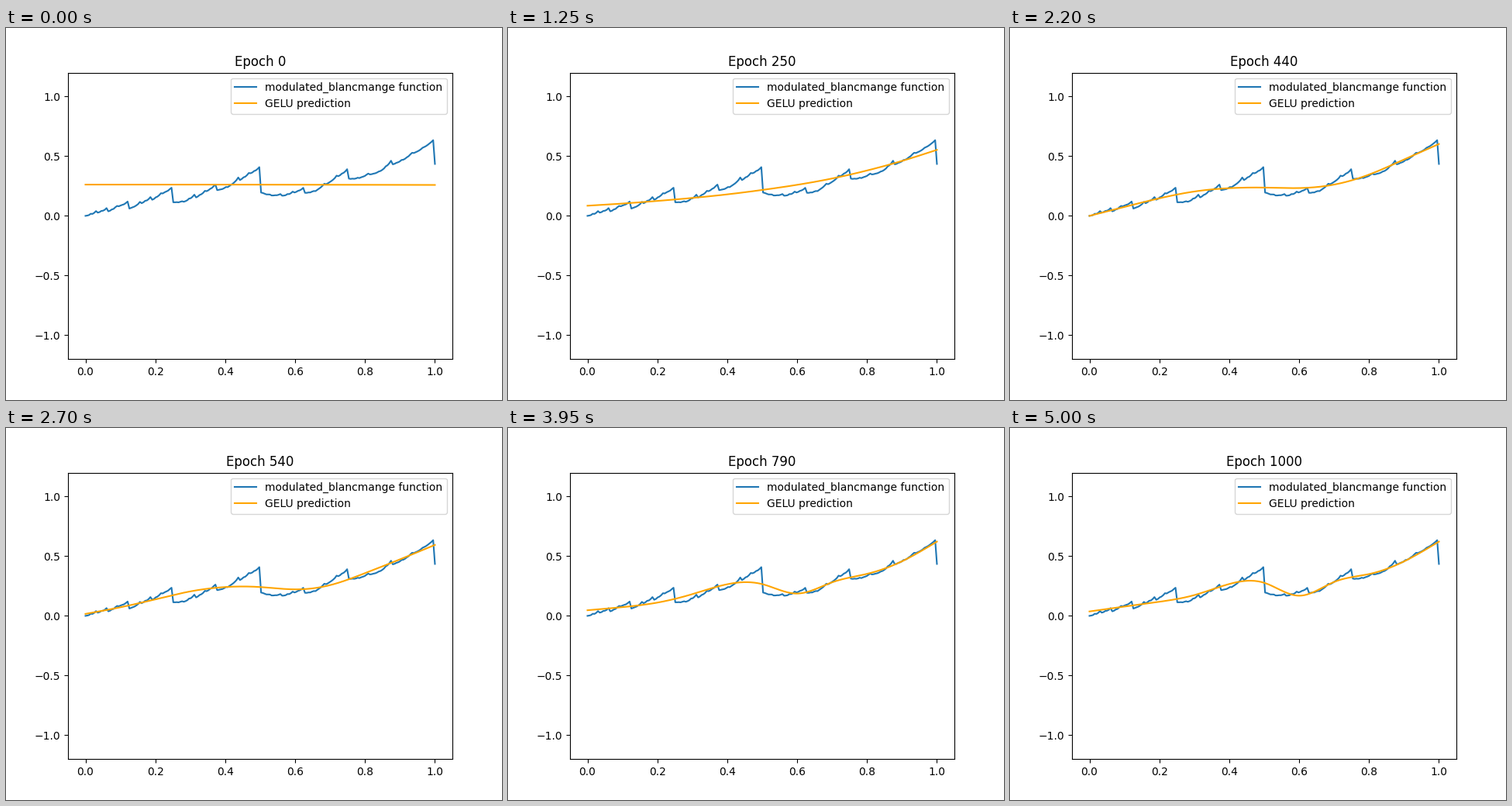
These frames come from a looping animation (640 px wide and 480 px high, 5050 ms). A matplotlib script:

```python
import numpy as np
import matplotlib.pyplot as plt
from matplotlib.animation import FuncAnimation

FRAMES, STEP_MS, EPOCHS = 101, 50, 10
x = np.linspace(0, 1, 200)

# Smooth trend carried by the fractal, sampled every 1/32
TREND = [0, .053, .081, .125, .135, .179, .1995, .231, .2275, .239, .267,
         .301, .311, .320, .344, .359, .340, .329, .327, .342, .339, .342,
         .376, .404, .400, .399, .409, .407, .430, .439, .450, .447, .435]


def blancmange(x, levels=20):
    """Return the sawtooth and the triangle series of halving scale."""
    saw, tri = np.zeros_like(x), np.zeros_like(x)
    for n in range(levels):
        u = (x * 2**n) % 1
        saw += u / 2**n
        tri += np.minimum(u, 1 - u) / 2**n
    return saw, tri


def modulated_blancmange(x):
    saw, tri = blancmange(x)
    trend = np.interp(x, np.linspace(0, 1, len(TREND)), TREND)
    return (.33 - .22 * x) * saw - .5 * tri + trend


def spline(values):
    """Natural cubic spline through evenly spaced values, evaluated on x."""
    v = np.array(values)
    n = len(v) - 1
    a = np.eye(n + 1)
    rhs = np.zeros(n + 1)
    for i in range(1, n):
        a[i, i - 1:i + 2] = 1, 4, 1
        rhs[i] = 6 * (v[i - 1] - 2 * v[i] + v[i + 1])
    m = np.linalg.solve(a, rhs)
    i = np.minimum((x * n).astype(int), n - 1)
    t = x * n - i
    s = 1 - t
    return (s * v[i] + t * v[i + 1]
            + ((s**3 - s) * m[i] + (t**3 - t) * m[i + 1]) / 6)


def parabola(c, b, a):
    return c + b * x + a * x**2


# Shape of the fit at chosen epochs; it blends between them
FITS = {
    0: parabola(.262, .001, -.004),
    50: parabola(-.012, .36, .08),
    90: parabola(.058, .264, .18),
    250: spline([.085, .103, .125, .150, .180, .217, .260, .313, .380, .460, .553]),
    330: spline([.004, .070, .128, .173, .205, .224, .243, .280, .346, .448, .580]),
    440: spline([.000, .075, .147, .204, .232, .237, .233, .262, .346, .472, .602]),
    640: spline([.033, .069, .130, .206, .251, .246, .211, .253, .370, .475, .587]),
    790: spline([.047, .073, .111, .182, .265, .266, .187, .281, .352, .457, .622]),
    1000: spline([.037, .078, .118, .174, .267, .277, .169, .284, .350, .456, .622]),
}
KEYS = np.array(list(FITS))
CURVES = np.array(list(FITS.values()))


def prediction(epoch):
    k = min(np.searchsorted(KEYS, epoch, side="right") - 1, len(KEYS) - 2)
    t = (epoch - KEYS[k]) / (KEYS[k + 1] - KEYS[k])
    return (1 - t) * CURVES[k] + t * CURVES[k + 1]


fig, ax = plt.subplots(figsize=(6.4, 4.8), dpi=100)
ax.plot(x, modulated_blancmange(x), label="modulated_blancmange function")
fit, = ax.plot(x, prediction(0), color="orange", label="GELU prediction")
ax.set_xlim(-.05, 1.05)
ax.set_ylim(-1.2, 1.2)
ax.legend(loc="upper right")
title = ax.set_title("Epoch 0")


def update(frame):
    epoch = frame * EPOCHS
    fit.set_ydata(prediction(epoch))
    title.set_text(f"Epoch {epoch}")
    return fit, title


anim = FuncAnimation(fig, update, frames=FRAMES, interval=STEP_MS,
                     repeat=True, repeat_delay=0)
plt.show()
```
